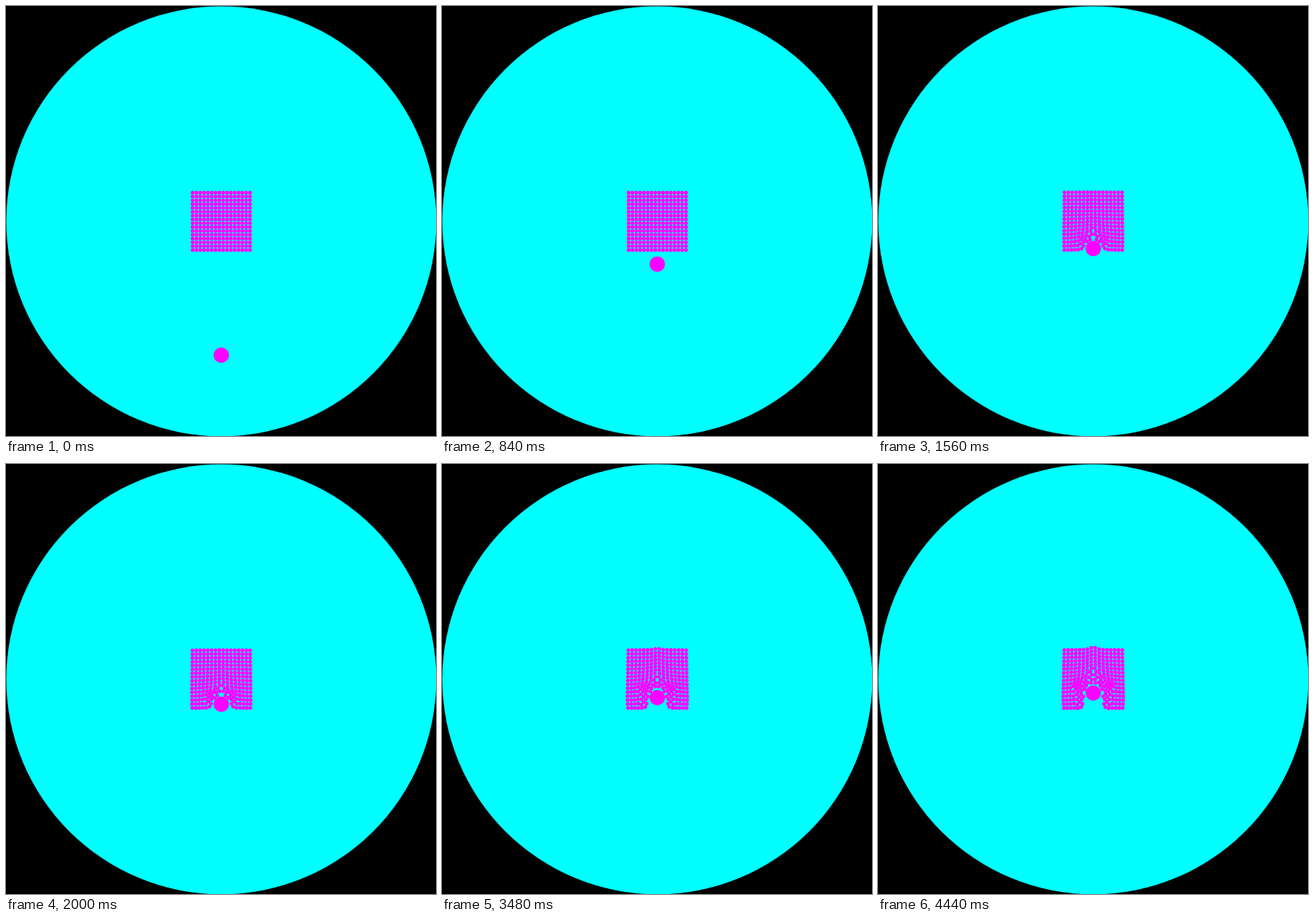
Recreate the animation shown at these times as an HTML page with a canvas. Size 600 by 600 pixels, loop 4480 ms.

```html
<!DOCTYPE html>
<html lang="en">
<head>
<meta charset="utf-8">
<title>Ball and grid</title>
<style>
  html, body { margin: 0; width: 100%; height: 100%; overflow: hidden; background: #000; }
  canvas { display: block; width: 600px; height: 600px; }
</style>
</head>
<body>
<canvas id="stage" width="600" height="600"></canvas>
<script>
const ctx = document.getElementById('stage').getContext('2d');
const LOOP = 4480, STEP = 40, SUBSTEPS = 4;
const CENTER = 300.4, SIDE = 16, GAP = 16 / 3;
const BIG = 32 / 3, SMALL = 2.6, REACH = 13.2, SPACING = 4.85;

// Time and height of the large ball: free flight, impact, slow advance.
const path = [
  [0, 487.2], [886, 353.2], [1000, 346.7], [1200, 342], [1560, 338.4],
  [2000, 335.2], [2800, 330.5], [3480, 325.9], [4480, 319.3]
];
const impactY = path[1][1];

function ballY(t) {
  let i = 1;
  while (i < path.length - 1 && t > path[i][0]) i++;
  const [t0, y0] = path[i - 1], [t1, y1] = path[i];
  return y0 + (y1 - y0) * (t - t0) / (t1 - t0);
}

const dots = Array.from({ length: SIDE * SIDE }, (_, i) => ({
  x: CENTER + (i % SIDE - (SIDE - 1) / 2) * GAP,
  y: CENTER + (Math.floor(i / SIDE) - (SIDE - 1) / 2) * GAP
}));

function push(y, move) {
  const depth = impactY - y;
  const lift = 0.24 * Math.min(1, Math.max(0, (depth - 15) / 12));
  for (const d of dots) {
    const dx = d.x - CENTER, dy = d.y - y, r = Math.hypot(dx, dy);
    const front = Math.max(0, -dy / r);
    const amount = move * (front + 0.12) * Math.min(1, REACH / r) ** 1.9;
    d.x += dx / r * amount;
    d.y += dy / r * amount;
    if (dy < 0) d.y -= move * lift * Math.exp(-((dx / 7) ** 2));
  }
}

function clearBall(y) {
  for (const d of dots) {
    const dx = d.x - CENTER, dy = d.y - y, r = Math.hypot(dx, dy);
    if (r >= REACH) continue;
    d.x = CENTER + dx / r * REACH;
    d.y = y + dy / r * REACH;
  }
}

function separate() {
  const shift = dots.map(() => [0, 0]);
  for (let i = 0; i < dots.length; i++) {
    for (let j = i + 1; j < dots.length; j++) {
      const dx = dots[j].x - dots[i].x, dy = dots[j].y - dots[i].y;
      const r2 = dx * dx + dy * dy;
      if (r2 >= SPACING * SPACING || r2 < 1e-6) continue;
      const r = Math.sqrt(r2), k = 0.25 * (SPACING - r) / r;
      shift[i][0] -= dx * k;
      shift[i][1] -= dy * k;
      shift[j][0] += dx * k;
      shift[j][1] += dy * k;
    }
  }
  dots.forEach((d, i) => {
    d.x += shift[i][0];
    d.y += shift[i][1];
  });
}

// Poses are worked out once, so drawing depends on the time alone.
const poses = [];
let lastY = impactY;
for (let t = 0; t < LOOP; t += STEP) {
  for (let s = 1; s <= SUBSTEPS; s++) {
    const y = ballY(t - STEP + STEP * s / SUBSTEPS);
    if (y >= impactY) continue;
    push(y, lastY - y);
    clearBall(y);
    separate();
    clearBall(y);
    lastY = y;
  }
  poses.push({ y: ballY(t), dots: dots.map(d => ({ ...d })) });
}

function disc(x, y, r, color) {
  ctx.fillStyle = color;
  ctx.beginPath();
  ctx.arc(x, y, r, 0, Math.PI * 2);
  ctx.fill();
}

function draw() {
  const pose = poses[Math.floor(performance.now() % LOOP / STEP)];
  ctx.fillStyle = '#000';
  ctx.fillRect(0, 0, 600, 600);
  disc(300.4, 300.4, 300, '#0ff');
  for (const d of pose.dots) disc(d.x, d.y, SMALL, '#f0f');
  disc(CENTER, pose.y, BIG, '#f0f');
  requestAnimationFrame(draw);
}
draw();
</script>
</body>
</html>
```
